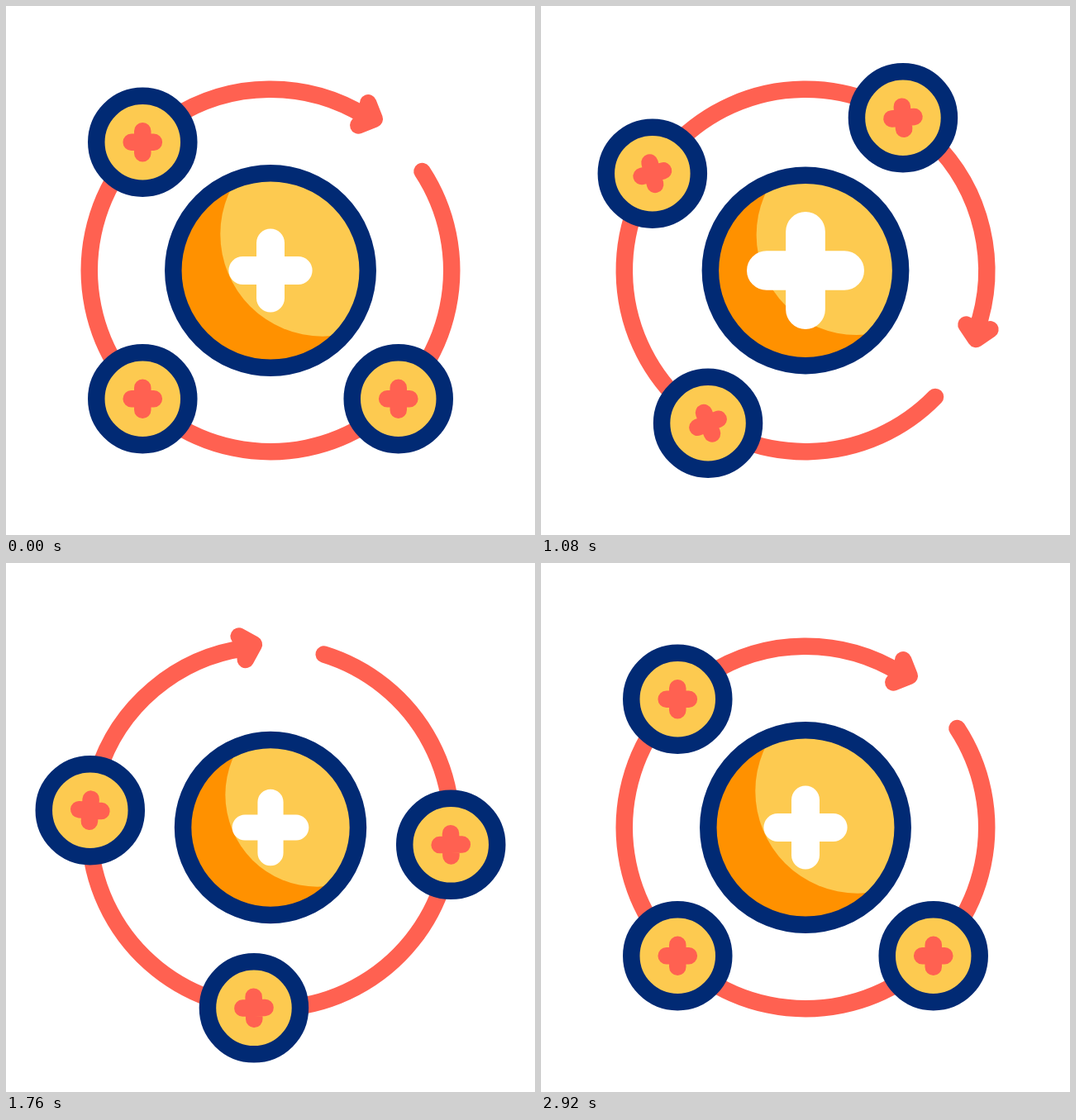
These frames come from a looping animation (640 px wide and 640 px high, 3 s). An HTML page with a canvas:

```html
<!DOCTYPE html>
<html lang="en">
<head>
<meta charset="utf-8">
<title>Rotating plus coins</title>
<style>
  html, body { margin: 0; height: 100%; overflow: hidden; background: #fff; }
  canvas { display: block; }
</style>
</head>
<body>
<canvas id="stage" width="640" height="640"></canvas>
<script>
const ctx = document.getElementById('stage').getContext('2d');
const LOOP = 3000, LINE = 20.5, ORBIT = 219.2;
const RED = '#ff6151', NAVY = '#012a74', YELLOW = '#fdca50', ORANGE = '#ff9100', WHITE = '#fff';

const rad = deg => deg * Math.PI / 180;
const mix = (a, b, u) => a + (b - a) * u;
const progress = (t, from, to) => Math.min(1, Math.max(0, (t - from) / (to - from)));
const easeInOut = u => (1 - Math.cos(Math.PI * u)) / 2;
const easeOut = u => Math.sin(Math.PI / 2 * u);

function cubicBezier(x1, y1, x2, y2) {
  const at = (a, b, s) => 3 * a * s * (1 - s) ** 2 + 3 * b * s * s * (1 - s) + s ** 3;
  return u => {
    let low = 0, high = 1;
    for (let i = 0; i < 24; i++) {
      const mid = (low + high) / 2;
      if (at(x1, x2, mid) < u) low = mid; else high = mid;
    }
    return at(y1, y2, high);
  };
}

// One full turn that first winds back, then overshoots.
const turn = cubicBezier(0.41, -0.27, 0.464, 1.355);
const orbitAngle = t => 360 * turn(progress(t, 364, 2598));

// Shrinks and grows twice around 1, swinging between the given beats.
const pulse = (low, high, beats) => t => {
  const sizes = [1, low, high, low, high, 1];
  const i = Math.max(0, beats.findLastIndex(beat => beat <= t));
  if (i === 5) return 1;
  return mix(sizes[i], sizes[i + 1], easeInOut(progress(t, beats[i], beats[i + 1])));
};
const coinScale = pulse(0.9, 1.05, [265, 850, 1300, 1770, 2320, 2900]);
const plusScale = pulse(0.87, 1.44, [200, 550, 1185, 1660, 2210, 2790]);

// Tips back, swings over to a small overshoot, then settles upright.
const tilt = (t, { ease, peak, peakTime }) => {
  const back = mix(0, -29.5, easeInOut(progress(t, 200, 560)));
  const over = mix(back, peak, ease(progress(t, 560, peakTime)));
  return mix(over, 0, easeInOut(progress(t, peakTime, 2900)));
};
const satellites = [
  { angle: 225.1, ease: easeOut, peak: 4, peakTime: 1560 },
  { angle: 134.9, ease: easeOut, peak: 0, peakTime: 2060 },
  { angle: 45.1, ease: easeInOut, peak: 4.8, peakTime: 2200 },
];

function stroke(color, width = LINE) {
  ctx.strokeStyle = color;
  ctx.lineWidth = width;
  ctx.stroke();
}

function disc(x, y, r, color) {
  ctx.beginPath();
  ctx.arc(x, y, r, 0, 2 * Math.PI);
  ctx.fillStyle = color;
  ctx.fill();
}

function plus(arm, width, color) {
  ctx.beginPath();
  ctx.moveTo(-arm, 0);
  ctx.lineTo(arm, 0);
  ctx.moveTo(0, -arm);
  ctx.lineTo(0, arm);
  stroke(color, width);
}

function drawArrow(angle) {
  ctx.save();
  ctx.rotate(rad(angle));
  ctx.beginPath();
  ctx.arc(0, 0, ORBIT, rad(-33.2), rad(302));
  ctx.moveTo(118.2, -202.6);
  ctx.lineTo(125.8, -183.3);
  ctx.lineTo(106.3, -175.6);
  stroke(RED);
  ctx.restore();
}

function drawSatellite(angle, tiltAngle) {
  ctx.save();
  ctx.translate(ORBIT * Math.cos(rad(angle)), ORBIT * Math.sin(rad(angle)));
  disc(0, 0, 56, YELLOW);
  stroke(NAVY);
  ctx.rotate(rad(tiltAngle));
  plus(13.6, 20.5, RED);
  ctx.restore();
}

function drawCoin(scale, plusSize) {
  const r = 117.7 * scale;
  ctx.save();
  disc(0, 0, r, ORANGE);
  ctx.clip();
  disc(63 * scale, -44 * scale, 123.7 * scale, YELLOW);
  ctx.restore();
  ctx.beginPath();
  ctx.arc(0, 0, r, 0, 2 * Math.PI);
  stroke(NAVY);
  plus(33.6 * plusSize, 34 * plusSize, WHITE);
}

function draw(t) {
  ctx.setTransform(1, 0, 0, 1, 0, 0);
  ctx.fillStyle = WHITE;
  ctx.fillRect(0, 0, 640, 640);
  ctx.translate(320, 320);
  ctx.lineCap = ctx.lineJoin = 'round';
  const angle = orbitAngle(t);
  drawArrow(angle);
  for (const s of satellites) drawSatellite(s.angle + angle, tilt(t, s));
  drawCoin(coinScale(t), plusScale(t));
}

const start = performance.now();
function tick() {
  draw((performance.now() - start) % LOOP);
  requestAnimationFrame(tick);
}
tick();
</script>
</body>
</html>
```
